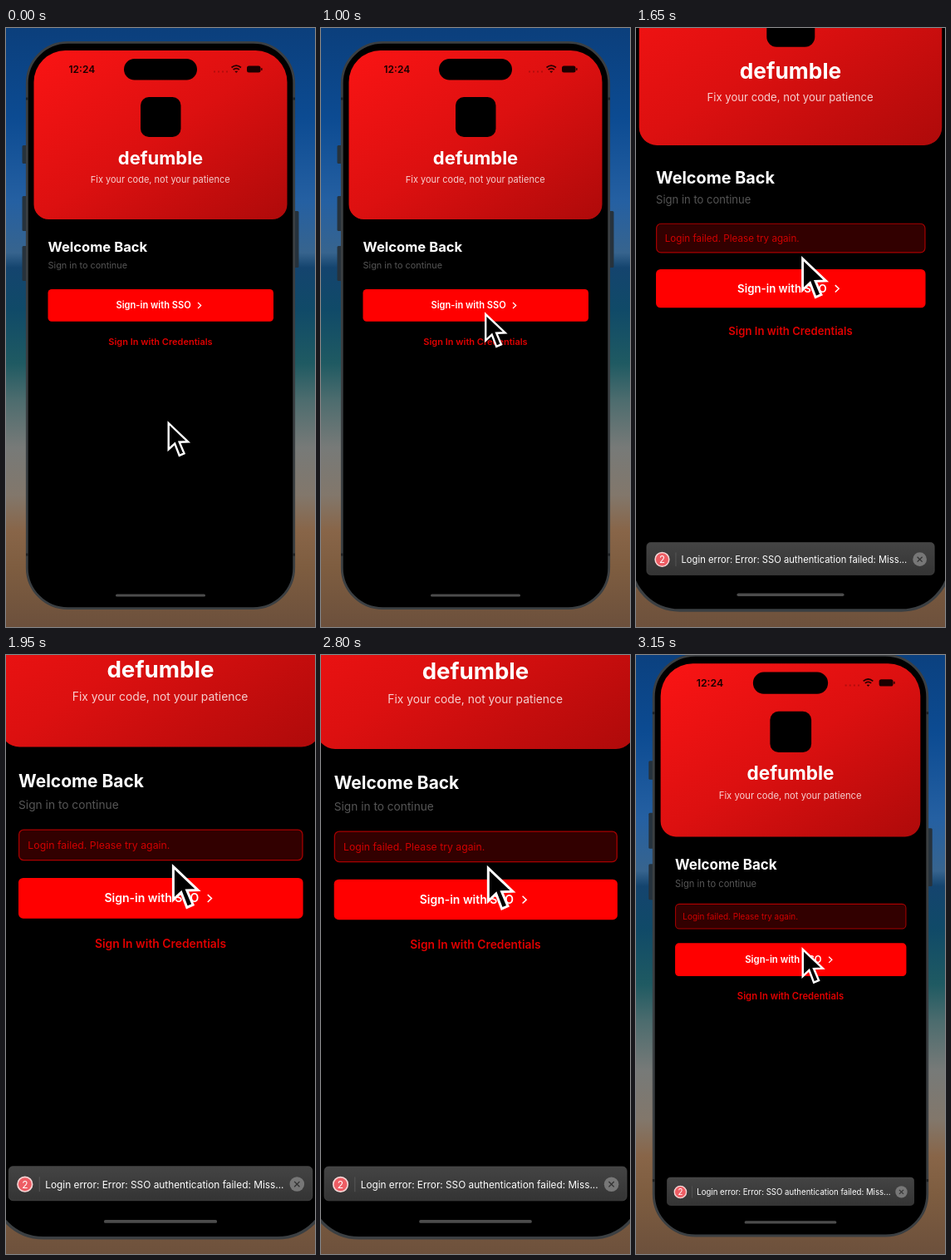
An HTML page that plays this animation: 372x720 px, repeating every 3200 ms.

```html
<!DOCTYPE html>
<html lang="en">
<head>
<meta charset="utf-8">
<title>Sign-in error</title>
<style>
  html, body { margin: 0; width: 100%; height: 100%; overflow: hidden; background: #0c4484; }
  svg { display: block; width: 372px; height: 720px; font-family: Inter, "Liberation Sans", sans-serif; }
  .mid { text-anchor: middle; }
</style>
</head>
<body>
<svg viewBox="0 0 372 720">
  <defs>
    <linearGradient id="beach" x1="0" y1="0" x2="0" y2="1">
      <stop offset="0" stop-color="#0b3f7c"/>
      <stop offset=".15" stop-color="#0c4b92"/>
      <stop offset=".29" stop-color="#2560a2"/>
      <stop offset=".375" stop-color="#37648e"/>
      <stop offset=".4" stop-color="#14446e"/>
      <stop offset=".47" stop-color="#104a68"/>
      <stop offset=".56" stop-color="#1f5a62"/>
      <stop offset=".62" stop-color="#4c6c6e"/>
      <stop offset=".7" stop-color="#777a78"/>
      <stop offset=".78" stop-color="#82776b"/>
      <stop offset=".84" stop-color="#886548"/>
      <stop offset=".9" stop-color="#7e5d40"/>
      <stop offset="1" stop-color="#6c503c"/>
    </linearGradient>
    <linearGradient id="banner" x1="0" y1="0" x2="1" y2="1">
      <stop offset="0" stop-color="#fa1414"/>
      <stop offset=".5" stop-color="#dc1010"/>
      <stop offset="1" stop-color="#ae0a0a"/>
    </linearGradient>
    <linearGradient id="bar" x1="0" y1="0" x2="0" y2="1">
      <stop offset="0" stop-color="#444"/>
      <stop offset="1" stop-color="#343434"/>
    </linearGradient>
  </defs>

  <g id="camera">
    <rect width="372" height="720" fill="url(#beach)"/>

    <!-- phone body -->
    <g fill="#26323c">
      <rect x="19.5" y="141" width="6" height="22" rx="1.5"/>
      <rect x="19.5" y="202" width="6" height="42" rx="1.5"/>
      <rect x="19.5" y="262" width="6" height="42" rx="1.5"/>
      <rect x="346.5" y="220" width="6" height="68" rx="1.5"/>
    </g>
    <rect x="25.3" y="17.3" width="321.4" height="680.4" rx="49" fill="#000" stroke="#3b3f42" stroke-width="2.8"/>
    <path d="M24 85h3M345 85h3M24 633h3M345 633h3" stroke="#1f2224" stroke-width="3"/>

    <!-- banner -->
    <path d="M33.5 65a38 38 0 0 1 38-38h229a38 38 0 0 1 38 38V212a18 18 0 0 1-18 18H51.500a18 18 0 0 1-18-18z" fill="url(#banner)"/>
    <rect x="142" y="37" width="88" height="25.500" rx="12.700"/>
    <text x="75.500" y="54" font-size="12" font-weight="600" fill="#1a0000">12:24</text>
    <g fill="none" stroke="#250000" stroke-width="1.700">
      <path d="M271.500 47.500q5.700-4.600 11.400 0M273.600 50q3.600-2.900 7.200 0"/>
      <path d="M275.800 52.200l1.400 1.200 1.400-1.200z" fill="#250000" stroke-width=".8"/>
    </g>
    <path d="M250 52.500h17" stroke="#300" stroke-width="1.800" stroke-dasharray="2 3" opacity=".25"/>
    <rect x="290" y="45.500" width="16.500" height="8" rx="2.500" fill="#1c0000"/>
    <rect x="307.200" y="48" width="1.300" height="3" rx=".6" fill="#1c0000"/>
    <rect x="162" y="83" width="48.500" height="48" rx="10"/>
    <text class="mid" x="186" y="163.500" font-size="22" font-weight="700" fill="#fff">defumble</text>
    <text class="mid" x="185.700" y="186" font-size="11" fill="#fff" fill-opacity=".8">Fix your code, not your patience</text>

    <!-- form -->
    <text x="50.500" y="268.500" font-size="16.600" font-weight="700" fill="#fff">Welcome Back</text>
    <text x="50.500" y="289" font-size="10.900" fill="#555">Sign in to continue</text>
    <g id="button">
      <rect x="50.500" y="314" width="271.500" height="38.700" rx="4.500" fill="#f00"/>
      <text x="132.500" y="337.300" font-size="11.100" font-weight="600" fill="#fff">Sign-in with SSO</text>
      <path d="M231 330l3.700 3.500-3.700 3.500" fill="none" stroke="#fff" stroke-width="1.200"/>
    </g>
    <text id="link" class="mid" x="186" y="380.500" font-size="11" font-weight="600" fill="#e00000">Sign In with Credentials</text>

    <g id="alert">
      <rect x="51" y="308.900" width="270.500" height="29" rx="4.500" fill="#320000" stroke="#a80000"/>
      <text x="59.500" y="327" font-size="9.750" fill="#d00000">Login failed. Please try again.</text>
    </g>

    <g id="toast">
      <rect x="41.200" y="629.500" width="289.700" height="32.500" rx="4" fill="url(#bar)" stroke="#4a4a4a" stroke-width=".6"/>
      <circle cx="56.700" cy="646.500" r="7" fill="#ee5d64" stroke="#f6d6d6" stroke-width="1.300"/>
      <text class="mid" x="56.700" y="650" font-size="9.500" fill="#fff">2</text>
      <path d="M70.500 639.500v14" stroke="#585858" stroke-width=".8"/>
      <text x="76" y="650" font-size="9.400" fill="#fff">Login error: Error: SSO authentication failed: Miss...</text>
      <circle cx="316.200" cy="646.400" r="7" fill="#777"/>
      <path id="cross" d="M313.700 643.900l5 5m0-5l-5 5" stroke="#333" stroke-width="1.100"/>
    </g>

    <rect x="132" y="680.500" width="108" height="3" rx="1.500" fill="#4c4c4c"/>

    <path id="cursor" d="M1 2.500V34L8.500 27 14 41.300l5.800-2.500L14 25.200l10.500-.4z" fill="#000" stroke="#fff" stroke-width="2.400"/>
  </g>
</svg>

<script>
const LOOP = 3200, STEP = 50;
const FOCUS = { x: 186, y: 686 };
const ZOOM = 0.268;
const el = id => document.getElementById(id);

// Critically damped spring from 0 to 1; rate is per millisecond.
function spring(elapsed, rate) {
  const k = rate * Math.max(0, elapsed);
  return 1 - (1 + k) * Math.exp(-k);
}

function show(id, on) {
  el(id).setAttribute("visibility", on ? "visible" : "hidden");
}

function shift(id, x, y) {
  el(id).setAttribute("transform", `translate(${x} ${y})`);
}

function draw(t) {
  const failed = t >= 1350, settled = t >= 1450;
  show("alert", failed);
  show("toast", failed);
  show("cross", settled);
  shift("link", 0, failed ? 40.700 : 0);
  shift("button", 0, settled ? 40.700 : 0);

  const arrive = spring(t, 0.012);
  const leave = Math.max(0, (t - 3050) / 100) ** 2;
  shift("cursor", 194.700 + 2.500 * arrive + 2.200 * leave, 472.500 - 131 * arrive + 18 * leave);

  const scale = 1 + ZOOM * (spring(t - 1402, 0.0104) - spring(t - 2769, 0.0104));
  el("camera").setAttribute("transform",
    `translate(${FOCUS.x} ${FOCUS.y}) scale(${scale}) translate(${-FOCUS.x} ${-FOCUS.y})`);
}

let start;
function tick(now) {
  start ??= now;
  draw(Math.floor(((now - start) % LOOP) / STEP) * STEP);
  requestAnimationFrame(tick);
}
draw(0);
requestAnimationFrame(tick);
</script>
</body>
</html>
```
